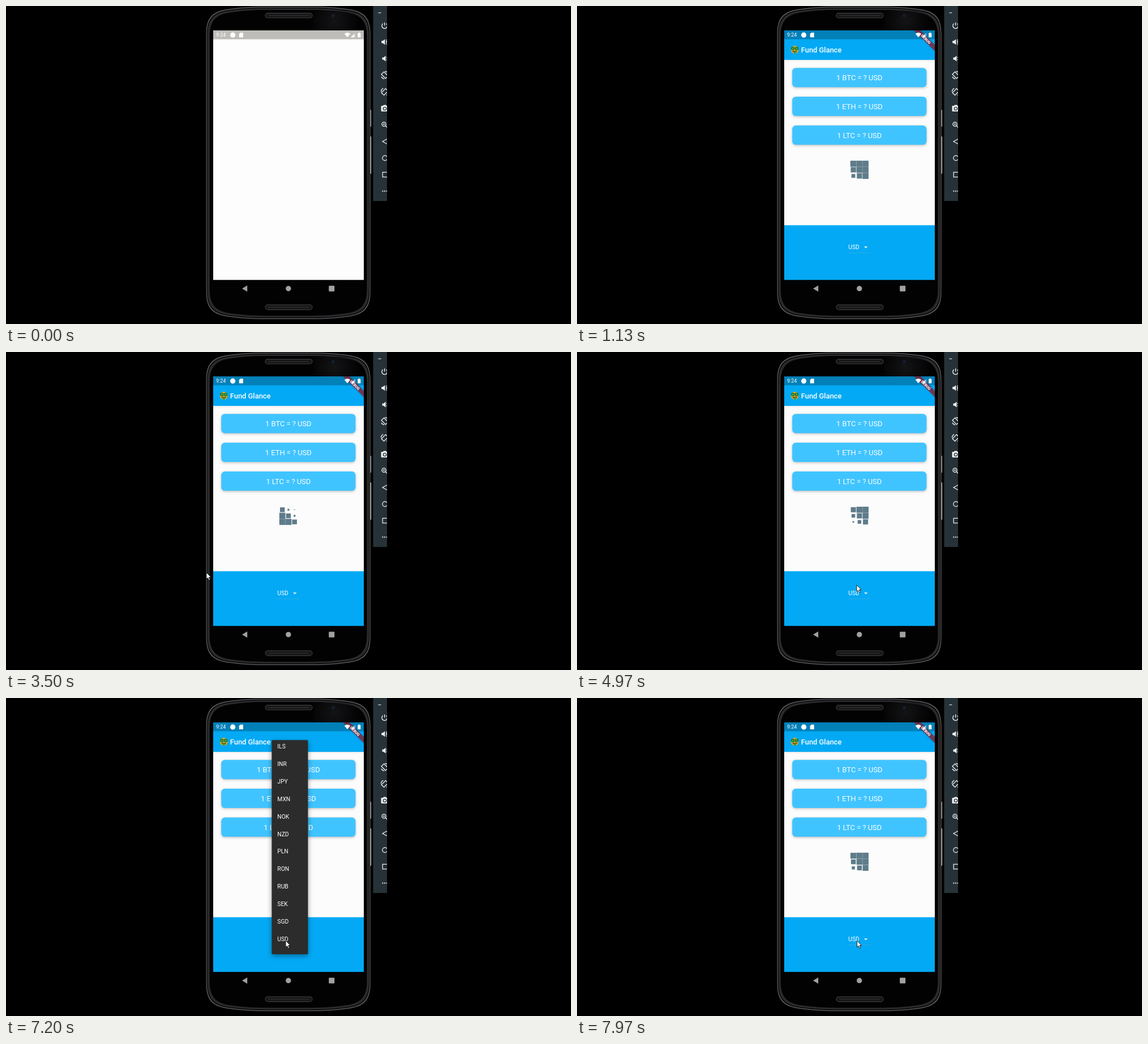
Write an HTML page with a canvas that moves like this. It is 998x561 px and loops after 8000 ms.

```html
<!DOCTYPE html>
<html lang="en">
<head>
<meta charset="utf-8">
<title>Currency rates on a phone</title>
<style>
html, body { margin: 0; width: 100%; height: 100%; overflow: hidden; background: #000; }
canvas { display: block; }
</style>
</head>
<body>
<canvas id="stage" width="998" height="561"></canvas>
<script>
const ctx = document.getElementById('stage').getContext('2d');
const LOOP = 8000;
const FONT = 'Roboto, Arial, sans-serif';
const SCREEN = { x: 366, y: 43, w: 266, h: 440.5 };
const OPEN = 6400, CLOSE = 7400, PRICED = 5535, RESET = 7600;
const CURRENCIES = 'HKD ILS INR JPY MXN NOK NZD PLN RON RUB SEK SGD USD'.split(' ');
const COINS = [['BTC', 19168], ['ETH', 594], ['LTC', 83]];

const REFRESH = [
  [30, 330, 8], [370, 970, 14], [1100, 1130, 2], [1270, 2130, 9], [2270, 3200, 7],
  [3370, 3700, 3], [4000, 4000, 1], [4300, 4970, 4], [5170, 5700, 4],
  [6100, 7030, 7], [7200, 7330, 2], [7500, 7970, 4]
];

const clamp = v => Math.max(0, Math.min(1, v));

function heldTime(t) {
  let held = 0;
  for (const [a, b, n] of REFRESH) {
    if (t < a) break;
    const step = n > 1 ? (b - a) / (n - 1) : 1;
    held = a + Math.min(n - 1, Math.floor((t - a) / step + 1e-6)) * step;
  }
  return held;
}

function rect(x, y, w, h, color) {
  ctx.fillStyle = color;
  ctx.fillRect(x, y, w, h);
}

function round(x, y, w, h, r, fill, stroke) {
  ctx.beginPath();
  ctx.roundRect(x, y, w, h, r);
  paint(fill, stroke);
}

function disc(x, y, r, fill, stroke) {
  ctx.beginPath();
  ctx.arc(x, y, r, 0, 7);
  paint(fill, stroke);
}

function poly(points, fill, stroke) {
  ctx.beginPath();
  points.forEach(([x, y]) => ctx.lineTo(x, y));
  ctx.closePath();
  paint(fill, stroke);
}

function line(x1, y1, x2, y2, color) {
  ctx.beginPath();
  ctx.moveTo(x1, y1);
  ctx.lineTo(x2, y2);
  paint(null, color);
}

function arc(x, y, r, a, b, color) {
  ctx.beginPath();
  ctx.arc(x, y, r, a, b);
  paint(null, color);
}

function paint(fill, stroke) {
  if (fill) { ctx.fillStyle = fill; ctx.fill(); }
  if (stroke) { ctx.strokeStyle = stroke; ctx.stroke(); }
}

function text(s, x, cy, size, { weight = 400, align = 'left', color = '#fff' } = {}) {
  ctx.font = `${weight} ${size}px ${FONT}`;
  ctx.textAlign = align;
  ctx.fillStyle = color;
  ctx.fillText(s, x, cy + size * 0.355);
}

function shadow(color, blur, dy) {
  ctx.shadowColor = color;
  ctx.shadowBlur = blur;
  ctx.shadowOffsetY = dy;
}

function scoped(draw) {
  ctx.save();
  draw();
  ctx.restore();
}

// One quarter of the case, mirrored around the centre.
function casePath() {
  const path = new Path2D();
  const quarter = new Path2D('M0 -275.5 H-45 C-70 -275.5 -88 -273.5 -104 -271.5 C-134 -268 -145 -256 -145 -228 V0 H0 Z');
  for (const sx of [1, -1]) {
    for (const sy of [1, -1]) path.addPath(quarter, new DOMMatrix([sx, 0, 0, sy, 498.6, 276.8]));
  }
  return path;
}

const CASE = casePath();

function drawCase(scaleX, scaleY, color) {
  scoped(() => {
    ctx.translate(498.6, 276.8);
    ctx.scale(scaleX, scaleY);
    ctx.translate(-498.6, -276.8);
    ctx.fillStyle = color;
    ctx.fill(CASE);
  });
}

function drawPhone() {
  ctx.lineWidth = 1.2;
  round(642.8, 183, 2.4, 30, 1, '#8b8b8d');
  round(642.8, 230, 2.4, 66, 1, '#a6a6a8');
  drawCase(1, 1, '#626266');
  drawCase(0.992, 0.9955, '#0c0c0d');
  drawCase(0.982, 0.989, '#2b2b2d');
  drawCase(0.958, 0.979, '#020203');

  const sheen = ctx.createRadialGradient(580, 26, 2, 580, 26, 45);
  sheen.addColorStop(0, '#131315');
  sheen.addColorStop(1, 'rgba(19,19,21,0)');
  rect(542, 8, 82, 35, sheen);

  for (const y of [12.6, 527.2]) {
    round(458, y, 83, 8.4, 4.2, '#161617', '#3c3c3e');
    rect(463, y + 3.4, 73, 1.6, '#2c2c2e');
  }
  disc(578, 17, 2.8, '#14202f');

  const nav = '#a1a1a1';
  poly([[417, 498.5], [426.2, 493], [426.2, 504]], nav);
  disc(498.8, 498.5, 4.7, nav);
  round(570.2, 493.5, 10, 10, 1, nav);
}

function drawToolbar() {
  scoped(() => {
    const w = '#f4f6f7';
    ctx.beginPath();
    ctx.rect(648.5, 0, 24.5, 344);
    ctx.clip();
    rect(648, 0, 26, 345, '#263238');
    ctx.lineWidth = 1.3;
    line(657.5, 12, 662.5, 12, '#b9c0c3');

    arc(668.7, 34.8, 4.8, -0.9, Math.PI + 0.9, w);
    line(668.7, 29, 668.7, 34.5, w);

    for (const [x, y] of [[663.3, 63.6], [664.6, 92.8]]) {
      poly([[x, y - 2], [x + 2.5, y - 2], [x + 6, y - 5], [x + 6, y + 5], [x + 2.5, y + 2], [x, y + 2]], w);
      arc(x + 6.6, y, 2.5, -1.2, 1.2, w);
    }
    arc(670, 63.6, 4.6, -1.2, 1.2, w);

    for (const [y, dir] of [[122, 1], [151.5, -1]]) {
      scoped(() => {
        ctx.translate(669, y);
        ctx.rotate(dir * Math.PI / 4);
        ctx.strokeStyle = w;
        ctx.strokeRect(-5.2, -3.2, 10.4, 6.4);
        arc(0, 0, 6.6, -2.3, -1.2, w);
        arc(0, 0, 6.6, 0.9, 1.9, w);
      });
    }

    round(662.6, 176, 13, 10, 1.2, w);
    rect(666.5, 174.6, 5, 2, w);
    disc(669, 181, 2.7, w, '#263238');

    disc(667.6, 208.5, 3.6, null, w);
    line(670.2, 211.2, 674, 215, w);
    ctx.lineWidth = 0.9;
    line(665.8, 208.5, 669.4, 208.5, w);
    line(667.6, 206.7, 667.6, 210.3, w);

    ctx.lineWidth = 1.2;
    poly([[665, 239], [673.5, 234.4], [673.5, 243.6]], null, w);
    disc(669.3, 268.2, 4.4, null, w);
    ctx.strokeRect(665.2, 293.3, 9, 8.4);
    for (const x of [665.5, 669.1, 672.7]) disc(x, 326.6, 1.15, w);
  });
}

function drawStatus() {
  const w = '#fff';
  text('9:24', 371, 51.3, 9);
  disc(400.6, 51.2, 4.6, w);
  poly([[414, 47], [418.8, 47], [418.8, 55.2], [411.8, 55.2], [411.8, 49.2]], w);
  ctx.beginPath();
  ctx.moveTo(603, 55.3);
  ctx.lineTo(597.8, 49);
  ctx.quadraticCurveTo(603, 45, 608.2, 49);
  ctx.closePath();
  paint(w);
  poly([[609, 55.2], [617, 47.2], [617, 55.2]], 'rgba(255,255,255,.45)');
  poly([[609, 55.2], [614.5, 49.7], [614.5, 55.2]], w);
  round(621.3, 47.7, 5, 7.6, 0.6, w);
  rect(622.8, 46.8, 2, 1.2, w);
}

function drawBanner() {
  scoped(() => {
    ctx.translate(SCREEN.x + SCREEN.w, SCREEN.y);
    ctx.rotate(Math.PI / 4);
    scoped(() => {
      shadow('rgba(0,0,0,.4)', 3, 0);
      rect(-25.8, 18.1, 51.6, 7.7, 'rgba(160,20,40,.66)');
    });
    text('DEBUG', 0, 22, 6.6, { weight: 900, align: 'center' });
  });
}

function drawFace() {
  disc(384.7, 77, 6.9, '#d9a82a');
  for (const x of [381.3, 388.1]) {
    disc(x, 75, 3.2, '#1e7a34');
    rect(x - 0.5, 73.3, 1, 3.4, '#b9c24a');
  }
  round(380.7, 79.2, 8, 2, 1, '#6b3d12');
  round(383, 79.6, 3.6, 4.2, 1, '#2f9443');
}

function cubeScale(u) {
  return u < 0 ? 1 - Math.pow(clamp(1 + u / 4), 1.68) : clamp(u * 0.47);
}

// A wave crosses the grid from bottom left to top right and back.
function drawSpinner(t) {
  const q = t < RESET ? 10.76 + t / 154 : Math.max(0, (t - 7616) / 154);
  const phase = 10 - Math.abs(10 - q % 20);
  const cell = 10.75;
  for (let i = 0; i < 9; i++) {
    const col = i % 3, row = Math.floor(i / 3);
    const s = cell * Math.max(0.1, cubeScale(phase - 3.7 - col - (2 - row)));
    const cx = 498.9 + (col - 1) * cell, cy = 289 + (row - 1) * cell;
    rect(cx - s / 2, cy - s / 2, s, s, '#5f7c8a');
  }
}

function drawMenu(t) {
  const p = (t - OPEN) / 300;
  const fade = t < CLOSE ? clamp(p * 4) : 1 - clamp((t - CLOSE) / 75);
  if (fade <= 0 || p <= 0) return;
  const grow = clamp(p * 2 - 0.5);
  const top = 410 + (74.2 - 410) * grow;
  const bottom = 441 + (452 - 441) * grow;
  scoped(() => {
    ctx.globalAlpha = fade;
    scoped(() => {
      shadow('rgba(0,0,0,.4)', 8, 3);
      round(469.4, top, 64, bottom - top, 1.4, '#2c2c2c');
    });
    ctx.beginPath();
    ctx.rect(469.4, top, 64, bottom - top);
    ctx.clip();
    CURRENCIES.forEach((c, i) => text(c, 479.3, 425.4 - (12 - i) * 30.92, 10.32));
  });
}

function drawApp(t) {
  const { x, y, w, h } = SCREEN;
  const loading = t < PRICED || t >= RESET;
  rect(x, 58, w, 329, '#fcfcfc');
  scoped(() => {
    shadow('rgba(0,0,0,.15)', 3, 0.5);
    rect(x, y, w, 52, '#03a9f4');
  });
  rect(x, y, w, 15.7, '#0280b8');
  drawFace();
  text('Fund Glance', 395.8, 77, 12.9, { weight: 500 });

  COINS.forEach(([coin, price], i) => {
    const cy = 126.2 + i * 50.8;
    scoped(() => {
      shadow('rgba(0,0,0,.24)', 4, 1.4);
      round(380.2, cy - 17, 237.2, 34, 6.4, '#40c4ff');
    });
    text(`1 ${coin} = ${loading ? '?' : price} USD`, 498.8, cy + 0.5, 12.9, { align: 'center' });
  });
  if (loading) drawSpinner(t);

  rect(x, 386.7, w, y + h - 386.7, '#03a9f4');
  text('USD', 479.3, 425.4, 10.32);
  poly([[506.8, 424.2], [513.6, 424.2], [510.2, 427.6]], '#d9eef8');
  rect(479.3, 435.2, 39, 0.7, 'rgba(189,189,189,.35)');
  drawMenu(t);
  drawBanner();
}

function drawCursor(t) {
  if (t < 3370) return;
  let x = 354, y = 389;
  if (t >= 4000) {
    const k = clamp((t - 4000) / 970);
    x = 442 + 52 * k;
    y = 425 - 14 * k;
  }
  if (t >= 6100) y = 428;
  if (t >= RESET) x = 494.6;
  scoped(() => {
    ctx.translate(x, y);
    ctx.lineWidth = 0.9;
    poly([[0, 0], [0, 11.6], [2.6, 9.2], [4.6, 13.6], [6.5, 12.8], [4.6, 8.5], [8.1, 8.5]], '#fff', '#111');
  });
}

function draw(now) {
  const t = heldTime(now % LOOP);
  const { x, y, w, h } = SCREEN;
  rect(0, 0, 998, 561, '#000');
  drawPhone();
  drawToolbar();
  scoped(() => {
    ctx.beginPath();
    ctx.rect(x, y, w, h);
    ctx.clip();
    if (t < 30) {
      rect(x, y, w, h, '#fdfdfd');
      rect(x, y, w, 15.7, '#bfbdb9');
    } else {
      drawApp(t);
    }
    drawStatus();
  });
  drawCursor(t);
}

const start = performance.now();
function tick() {
  draw(performance.now() - start);
  requestAnimationFrame(tick);
}
tick();
</script>
</body>
</html>
```
